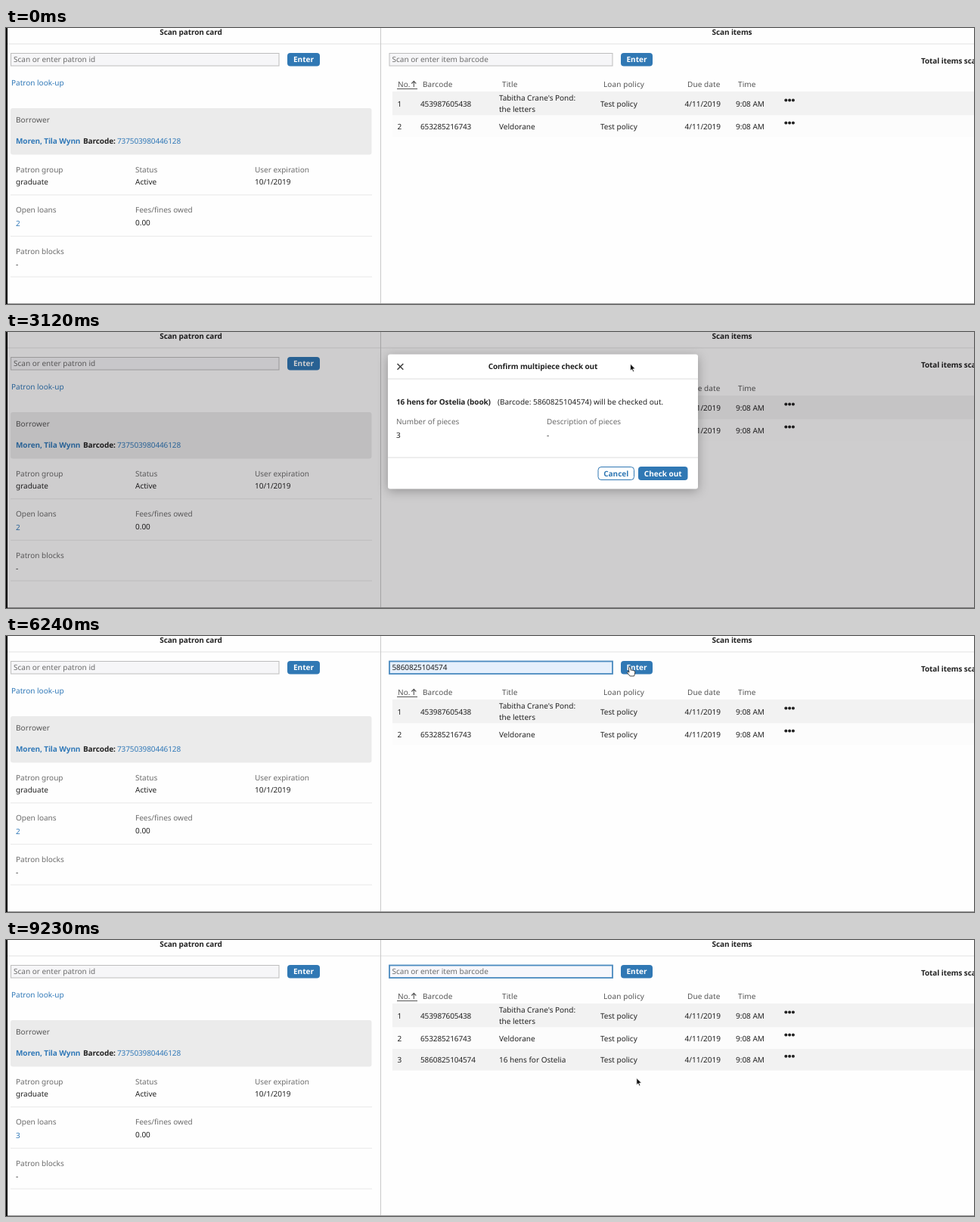
Write an HTML page that moves like this. It is 1280 px wide and 365 px high and loops after 9360 ms.

```html
<!DOCTYPE html>
<html lang="en">
<head>
<meta charset="utf-8">
<title>Check out</title>
<style>
  html, body { margin: 0; width: 100%; height: 100%; overflow: hidden; background: #fefefe; }
  svg { display: block; width: 100vw; height: 100vh; }
  text {
    font: 400 10px "Noto Sans", "Open Sans", sans-serif;
    fill: #222; white-space: pre; text-rendering: geometricPrecision;
  }
  .b { font-weight: 600; letter-spacing: -.1px; }
  .label { fill: #6c6c6c; }
  .head { font-weight: 500; fill: #555; letter-spacing: .1px; }
  .link { fill: #3179b8; }
  .num { letter-spacing: -.12px; }
  .mid { text-anchor: middle; }
  .btn { font-weight: 600; fill: #fff; text-anchor: middle; }
  #modal { filter: drop-shadow(0 3px 7px rgba(0, 0, 0, .28)); }
</style>
</head>
<body>
<svg id="stage" viewBox="0 0 1280 365" preserveAspectRatio="none"></svg>
<script>
const LOOP = 9360, TICK = 130;
const BLUE = '#3078b4';
const stage = document.getElementById('stage');

function add(parent, tag, attrs, content) {
  const el = document.createElementNS('http://www.w3.org/2000/svg', tag);
  for (const key in attrs) el.setAttribute(key, attrs[key]);
  if (content !== undefined) el.textContent = content;
  parent.appendChild(el);
  return el;
}
const group = (parent, id) => add(parent, 'g', id ? { id } : {});
const text = (parent, x, y, str, cls = '') => add(parent, 'text', { x, y, class: cls }, str);
const rect = (parent, x, y, width, height, fill, more = {}) =>
  add(parent, 'rect', { x, y, width, height, fill, ...more });
const path = (parent, d, stroke, width = 1, more = {}) =>
  add(parent, 'path', { d, stroke, 'stroke-width': width, fill: 'none', ...more });

function button(parent, x, y, w, h, label) {
  const g = group(parent);
  const box = rect(g, x, y, w, h, BLUE, { rx: 4 });
  const caption = text(g, x + w / 2, y + h / 2 + 3.7, label, 'btn');
  return { box, caption };
}

function ring(parent, x, y, w, h) {
  const g = group(parent);
  rect(g, x - .5, y - .5, w + 1, h + 1, 'none', { rx: 4.5, stroke: '#3c7fb6' });
  rect(g, x + .9, y + .9, w - 1.8, h - 1.8, 'none', { rx: 3.5, stroke: '#b4cee2', 'stroke-width': .9 });
  return g;
}

// Page frame
const page = group(stage);
rect(page, 0, 0, 1280, 365, '#fefefe');
path(page, 'M2 21H1280', '#e3e3e3');
path(page, 'M495.5 0V365', '#c9c9c9');
path(page, 'M0 364.5H1280', '#9a9a9a');
rect(page, 0, 0, 2, 365, '#000');

// Patron pane
text(page, 244.5, 9, 'Scan patron card', 'b mid');
rect(page, 6.5, 33.5, 354.5, 16.5, '#f6f6f8', { stroke: '#bdbdbd' });
text(page, 10, 45.3, 'Scan or enter patron id', 'label');
button(page, 372, 33, 43, 17.5, 'Enter');
text(page, 7, 76, 'Patron look-up', 'link');
rect(page, 6, 106, 477.5, 61.5, '#ebebeb', { rx: 3 });
text(page, 13, 124.7, 'Borrower', 'head');
text(page, 13, 153, 'Moren, Tila Wynn', 'b link');
text(page, 102, 153, 'Barcode:', 'b');
text(page, 147, 153, '737503980446128', 'link num');
[
  [13, 190.5, 'Patron group', 'graduate'],
  [171, 190.5, 'Status', 'Active'],
  [329, 190.5, 'User expiration', '10/1/2019'],
  [13, 244.3, 'Open loans', ''],
  [171, 244.3, 'Fees/fines owed', '0.00'],
  [13, 298.8, 'Patron blocks', '-']
].forEach(([x, y, name, value]) => {
  text(page, x, y, name, 'label');
  text(page, x, y + 16.8, value);
});
const loans = text(page, 13, 261.5, '2', 'link');
[220.8, 275.3, 329].forEach(y => path(page, `M6 ${y}H484`, '#e8e8e8'));

// Items pane
text(page, 960, 9, 'Scan items', 'b mid');
text(page, 1210, 46.7, 'Total items scanned', 'b');
const field = rect(page, 507, 33.5, 295, 16.5, '#f6f6f8');
const entry = text(page, 510.5, 45.3, '');
const caret = path(page, 'M511.5 36V48', '#222');
const enter = button(page, 813, 33, 42, 17.5, 'Enter');

text(page, 518, 78.3, 'No.', 'head');
path(page, 'M539.3 78V70.5M536.3 73.5L539.3 70.3L542.3 73.5', '#555', 1.1);
path(page, 'M517 80.5H544', '#555');
[[551, 'Barcode'], [656, 'Title'], [790, 'Loan policy'], [901, 'Due date'], [968, 'Time']]
  .forEach(([x, name]) => text(page, x, 78.3, name, 'head'));

function row(n, top, h, mid, fill, code, lines) {
  const g = group(page);
  rect(g, 511, top, 769, h, fill);
  const y = mid + 3.7;
  text(g, 517.5, y, n);
  text(g, 548, y, code, 'num');
  lines.forEach((line, i) => text(g, 652, y + (i - (lines.length - 1) / 2) * 15.5, line));
  text(g, 786, y, 'Test policy');
  text(g, 897.5, y, '4/11/2019');
  text(g, 965, y, '9:08 AM');
  for (let i = 0; i < 3; i++)
    add(g, 'circle', { cx: 1031.3 + i * 4.8, cy: mid - 4.4, r: 2, fill: '#222' });
  return g;
}
row(1, 84, 31.5, 100, '#f2f2f2', '453987605438', ["Tabitha Crane's Pond:", 'the letters']);
row(2, 115.5, 28.5, 129.8, '#fcfcfc', '653285216743', ['Veldorane']);
const lastRow = row(3, 144, 28.5, 158.2, '#f2f2f2', '5860825104574', ['16 hens for Ostelia']);

// Dialog
const shade = rect(stage, 0, 0, 1280, 365, '#080006');
const modal = group(stage, 'modal');
rect(modal, 505, 29.5, 410, 178, '#fff', { rx: 3 });
path(modal, 'M505 62H915M505 166H915', '#dcdcdc');
path(modal, 'M517.5 42L525.3 49.8M525.3 42L517.5 49.8', '#444', 1.6);
text(modal, 710, 49.2, 'Confirm multipiece check out', 'b mid');
text(modal, 516, 95.5, '16 hens for Ostelia (book)', 'b');
text(modal, 650, 95.5, '(Barcode: 5860825104574) will be checked out.');
text(modal, 516, 121.7, 'Number of pieces', 'label');
text(modal, 715, 121.7, 'Description of pieces', 'label');
text(modal, 516, 140.3, '3');
text(modal, 715, 140.3, '-');
const cancel = button(modal, 783, 178.5, 47.5, 17, 'Cancel');
cancel.box.setAttribute('stroke', BLUE);
button(modal, 836, 178, 65.5, 18, 'Check out');
const cancelRing = ring(modal, 783, 178.3, 47.5, 17.4);
const checkRing = ring(modal, 836, 178.3, 65.5, 17.4);

// Pointers, each with its hot spot at 0,0
const pointer = group(stage);
const shapes = {
  arrow: path(pointer, 'M0 0V9.2L2.1 7.3L3.6 10.6L5.1 9.9L3.7 6.8L6.6 6.6Z', '#fff', .8, { fill: '#111' }),
  hand: path(pointer,
    'M-1.2 .6Q0 -.7 1.2 .6L1.7 4.2Q3 3.5 3.8 4.6Q5 4 5.7 5.1Q7.2 4.8 7.3 6.4L6.8 9.6L6 12H.6L-3 7.6Q-3.2 6 -1.6 6.4L-.6 7.2Z',
    '#333', .9, { fill: '#fff' }),
  beam: path(pointer, 'M-2.3 -6Q0 -6 0 -4.5Q0 -6 2.3 -6M0 -4.5V4.5M-2.3 6Q0 6 0 4.5Q0 6 2.3 6', '#666', 1)
};

// Motion tables: time, then values
const trail = [
  [0, 690, 285], [130, 690, 285], [780, 565, 42], [1690, 565, 42], [2340, 825.5, 43.5],
  [3250, 825.5, 42], [4030, 815.5, 186], [4420, 815.5, 186], [4940, 565, 42], [5590, 565, 42],
  [6240, 824.5, 41], [7020, 824.5, 41], [7540, 870.5, 189], [8060, 870.5, 189],
  [8580, 833.8, 182.5], [LOOP, 833.8, 182.5]
];
const dialog = [
  [0, 0], [2600, 0], [2730, .67], [2860, .92], [2990, 1], [4420, 1], [4550, .4], [4680, 0],
  [6630, 0], [6760, .67], [6890, .92], [7020, 1], [7800, 1], [7930, .4], [8060, 0], [LOOP, 0]
];
const filled = [[1690, 4550], [5590, 7930]];
const busy = [[2470, 4550], [6500, 7930]];
const focused = [[910, 2470], [4550, 6500], [7930, LOOP]];
const caretOn = [[910, 1300], [4550, 4810], [5070, 5330], [7930, 8450], [8840, 9230]];

const during = (t, spans) => spans.some(([a, b]) => t >= a && t < b);
const show = (el, on) => el.setAttribute('visibility', on ? 'inherit' : 'hidden');

function sample(table, t, ease = u => u) {
  const i = table.findIndex((k, n) => n && t < k[0]);
  const a = table[i - 1], b = table[i];
  const u = ease((t - a[0]) / (b[0] - a[0]));
  return a.slice(1).map((v, n) => v + (b[n + 1] - v) * u);
}
const smooth = u => u * u * (3 - 2 * u);

function pointerKind(x, y, open) {
  if (open) return y > 178 && y < 196 && x > 783 && x < 901 ? 'hand' : 'arrow';
  if (y < 33 || y > 50) return 'arrow';
  if (x > 507 && x < 802) return 'beam';
  return x > 813 && x < 855 ? 'hand' : 'arrow';
}

function draw(t) {
  const [open] = sample(dialog, t);
  const [x, y] = sample(trail, t, smooth);
  const hasCode = during(t, filled), wait = during(t, busy), focus = during(t, focused);

  field.setAttribute('fill', hasCode ? '#e6f0fc' : focus ? '#f7f7fc' : '#f6f6f8');
  field.setAttribute('stroke', focus ? '#4a8abf' : hasCode ? '#9aa5b0' : '#bdbdbd');
  field.setAttribute('stroke-width', focus ? 1.8 : 1);
  entry.textContent = hasCode ? '5860825104574' : 'Scan or enter item barcode';
  entry.setAttribute('class', hasCode ? 'num' : 'label');
  show(caret, !hasCode && during(t, caretOn));
  enter.box.setAttribute('fill', wait ? '#cacaca' : BLUE);
  enter.caption.style.fill = wait ? '#858585' : '#fff';

  loans.textContent = t >= 8840 ? '3' : '2';
  show(lastRow, t >= 8320);

  shade.setAttribute('opacity', .192 * open);
  show(modal, open > 0);
  modal.setAttribute('opacity', Math.min(1, open * 1.48));
  modal.setAttribute('transform', `translate(0 ${(1 - open) * 19.5})`);
  const pressed = during(t, [[4160, 4680]]);
  cancel.box.setAttribute('fill', pressed ? BLUE : '#fff');
  cancel.caption.style.fill = BLUE;
  show(cancelRing, during(t, [[4290, 4680]]));
  show(checkRing, during(t, [[7670, 8060]]));

  pointer.setAttribute('transform', `translate(${x} ${y})`);
  const kind = t < TICK ? '' : pointerKind(x, y, open > 0);
  for (const name in shapes) show(shapes[name], name === kind);
}

const start = performance.now();
function frame() {
  const t = (performance.now() - start) % LOOP;
  draw(Math.floor(t / TICK) * TICK);
  requestAnimationFrame(frame);
}
frame();
</script>
</body>
</html>
```
